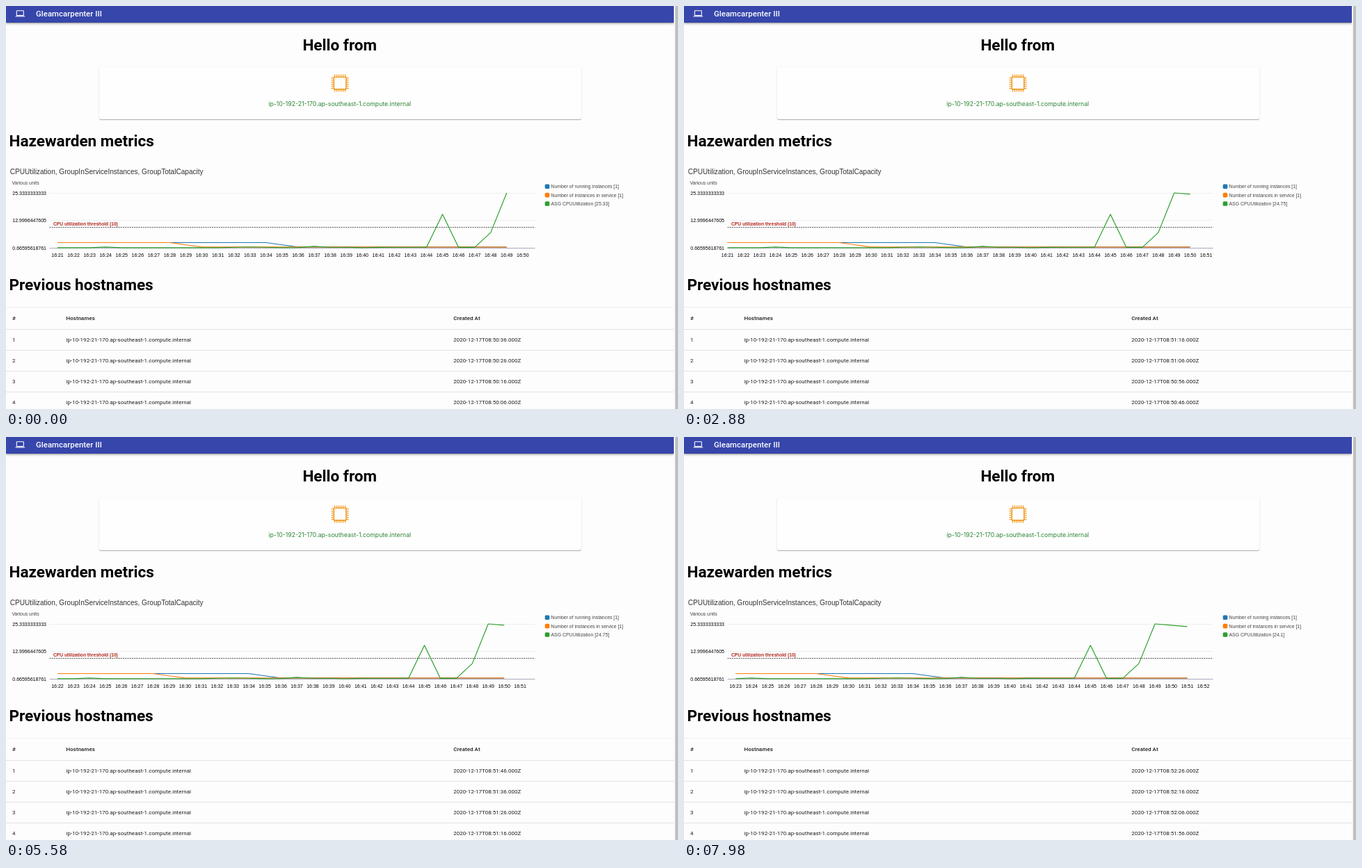
These frames come from a looping animation (966x580 px, 8 s). An HTML page:

```html
<!DOCTYPE html>
<html lang="en">
<head>
<meta charset="utf-8">
<title>Instance dashboard</title>
<style>
  html, body { margin: 0; width: 100%; height: 100%; overflow: hidden; background: #fdfdfd; }
  body { position: relative; }
  div, svg { position: absolute; }
  .bar { left: 0; top: 0; width: 960px; height: 24px; background: #3646ab;
    box-shadow: 0 1px 2px rgba(0,0,0,.3), 0 2px 4px rgba(0,0,0,.14); }
  .card { left: 134px; top: 88px; width: 693px; height: 75px; background: #fefefe; border-radius: 2px;
    box-shadow: 0 1px 1px -.5px rgba(0,0,0,.3), 0 .6px .6px rgba(0,0,0,.2), 0 .6px 2px rgba(0,0,0,.14); }
  .scroll { left: 960px; top: 0; width: 6px; height: 580px; background: linear-gradient(90deg, #f5f5f5 2px, #bfbfbf 2px); }
  svg { left: 0; top: 0; }
  text { font: 7px "Liberation Sans", Arial, sans-serif; fill: #000; }
  .h1 { font: 700 22.55px Roboto, sans-serif; }
  .cell { font: 7.9px Roboto, sans-serif; letter-spacing: .01071em; fill: #1c1c1c; }
  .head { font-weight: 500; }
  .app { font: 500 11.3px Roboto, sans-serif; letter-spacing: .0075em; fill: #fff; }
  .host { font: 8.7px Inter, sans-serif; fill: #2b8532; text-anchor: middle; }
  .title { font-size: 10.08px; fill: #333; }
  .note { font-size: 6.88px; fill: #444; }
  .limit { font-size: 6.67px; font-weight: 700; fill: #b3261e; }
  .mid { text-anchor: middle; }
  .end { text-anchor: end; }
  polyline { fill: none; stroke-width: 1.2; stroke-linejoin: round; }
</style>
</head>
<body>
<div class="bar"></div>
<div class="card"></div>
<div class="scroll"></div>
<svg width="966" height="580" viewBox="0 0 966 580">
  <g id="fixed"></g>
  <g id="live"></g>
</svg>
<script>
const LOOP = 8000, FIRST_REFRESH = 405, REFRESH = 750;
const LEFT = 62.5, RIGHT = 760.5, BOTTOM = 348, TOP = 269;
const MIN = 0.66595618761, MAX = 25.3333333333;
const HOST = 'ip-10-192-21-170.ap-southeast-1.compute.internal';
const BLUE = '#1f77b4', ORANGE = '#ff7f0e', GREEN = '#2ca02c';

const pad = n => String(n).padStart(2, '0');
const text = (x, y, cls, str) => `<text x="${x}" y="${y}" class="${cls}">${str}</text>`;
const line = (x1, y1, x2, y2, color, extra = '') =>
  `<line x1="${x1}" y1="${y1}" x2="${x2}" y2="${y2}" stroke="${color}" ${extra}/>`;
const yOf = v => BOTTOM - (v - MIN) / (MAX - MIN) * (BOTTOM - TOP);

// Metric values by minute after 16:00
const dropAfter = last => m => Math.max(1, Math.min(3, 3 - (m - last)));
const cpuPoints = { 24: 1, 32: .9, 33: 1.05, 34: .9, 36: .8, 37: 1.3, 38: .9, 40: .67, 41: .85,
  44: .9, 45: 15.7, 46: .85, 47: .85, 48: 7.5, 49: MAX, 50: 24.75, 51: 24.1 };
const cpu = m => cpuPoints[m] ?? (m > 37 ? .9 : .72);

function chip() {
  let s = '<g fill="none" stroke="#f29a1f" stroke-width="1.6"><rect x="471.3" y="102.3" width="17.6" height="17.6" rx=".6"/>';
  for (let i = 0; i < 6; i++) {
    const d = (i - 2.5) * 3, x = 480.1 + d, y = 111.1 + d;
    s += `<path stroke-width="1.3" d="M${x} 98.6v3M${x} 120.6v3M467.6 ${y}h3M489.6 ${y}h3"/>`;
  }
  return s + '</g>';
}

function fixedParts() {
  let s = '<g fill="none" stroke="#fff" stroke-width="1.1"><rect x="15.3" y="6.8" width="10" height="6.8" rx=".6"/><path d="M13.6 14.9h13.5"/></g>';
  s += text(43, 14.8, 'app', 'Gleamcarpenter III');
  s += text(479.7, 63.6, 'h1 mid', 'Hello from') + chip() + text(479.8, 143.6, 'host', HOST);
  s += text(4.5, 202.4, 'h1', 'Hazewarden metrics') + text(4.5, 409, 'h1', 'Previous hostnames');
  s += text(5.8, 241.6, 'title', 'CPUUtilization, GroupInServiceInstances, GroupTotalCapacity');
  s += text(8.4, 257, 'note', 'Various units');
  ['25.3333333333', '12.9996447605', '0.66595618761'].forEach((label, i) => {
    const y = TOP + i * 39.5;
    s += text(58, y + 2.6, 'end', label);
    s += line(LEFT, Math.floor(y) + .5, RIGHT, Math.floor(y) + .5, i < 2 ? '#eee' : '#aaa8bb');
  });
  s += line(LEFT, 318.5, RIGHT, 318.5, '#444', 'stroke-dasharray="2 1.2" stroke-width=".9"');
  s += text(68, 316.4, 'limit', 'CPU utilization threshold (10)');
  [BLUE, ORANGE, GREEN].forEach((color, i) => {
    s += `<rect x="774.7" y="${256.4 + i * 12.4}" width="6.6" height="6.6" rx="1.6" fill="${color}"/>`;
  });
  s += text(783.5, 262.3, 'note', 'Number of running instances [1]');
  s += text(783.5, 274.7, 'note', 'Number of instances in service [1]');
  s += text(9, 452.3, 'cell head', '#') + text(86.5, 452.3, 'cell head', 'Hostnames') + text(643.3, 452.3, 'cell head', 'Created At');
  s += line(0, 433.5, 960, 433.5, '#efefef');
  for (let i = 0; i < 4; i++) {
    const y = 465.5 + i * 30;
    s += line(0, y, 960, y, '#e2e2e2');
    s += text(9, y + 17.8, 'cell', i + 1) + text(86.5, y + 17.8, 'cell', HOST);
  }
  return s;
}

function liveParts(refresh) {
  const rowTime = 3036 + refresh * 10;      // seconds after the hour
  const now = (rowTime + 10) / 60;
  const start = Math.floor((now - 30) * 2 + 1e-6) / 2;
  const xOf = m => LEFT + (m - start) / (now - start) * (RIGHT - LEFT);
  const first = Math.ceil(start);
  const series = (value, last, color) => {
    let points = '';
    for (let m = first; m <= last; m++) points += `${xOf(m).toFixed(2)},${yOf(value(m)).toFixed(2)} `;
    return `<polyline points="${points}" stroke="${color}"/>`;
  };
  const lastGroup = Math.floor(now - 1), lastCpu = Math.floor(now - 4 / 3);

  let s = series(dropAfter(34), lastGroup, BLUE) + series(dropAfter(28), lastGroup, ORANGE) + series(cpu, lastCpu, GREEN);
  for (let m = first; m <= now; m++) s += text(xOf(m).toFixed(2), 360.8, 'mid', '16:' + pad(m));
  s += text(783.5, 287.1, 'note', `ASG CPUUtilization [${+cpu(lastCpu).toFixed(2)}]`);
  for (let i = 0; i < 4; i++) {
    const t = rowTime - i * 10;
    s += text(643.3, 483.3 + i * 30, 'cell', `2020-12-17T08:${pad(Math.floor(t / 60))}:${pad(t % 60)}.000Z`);
  }
  return s;
}

const live = document.getElementById('live');
document.getElementById('fixed').innerHTML = fixedParts();
let shown = -1;
function draw() {
  const t = performance.now() % LOOP;
  const refresh = Math.max(0, Math.floor((t - FIRST_REFRESH) / REFRESH) + 1);
  if (refresh !== shown) live.innerHTML = liveParts(shown = refresh);
  requestAnimationFrame(draw);
}
draw();
</script>
</body>
</html>
```
